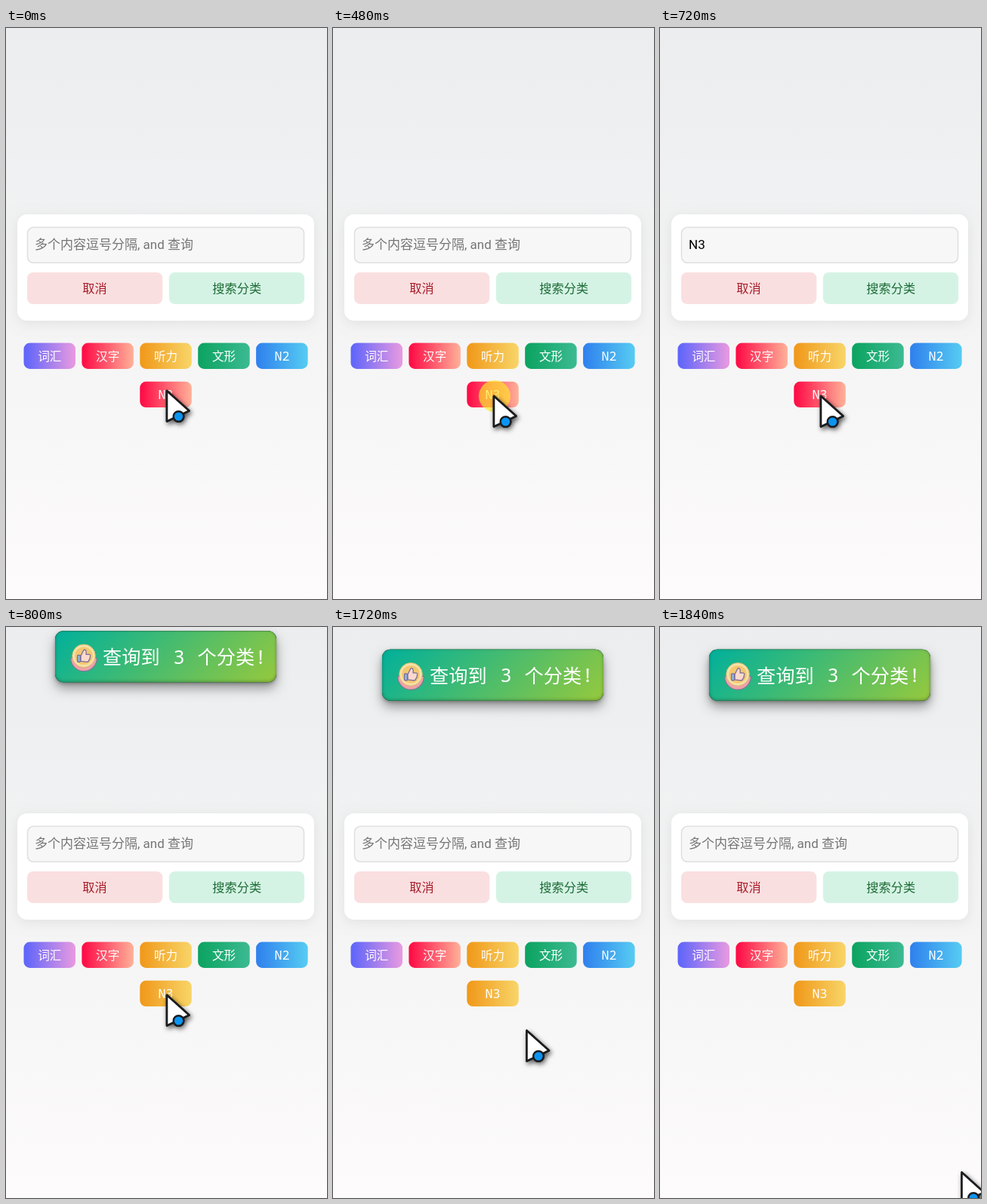
An HTML page with a canvas for the animation above (1.88 s loop, 425 by 757 pixels).

```html
<!DOCTYPE html>
<html lang="zh-CN">
<head>
<meta charset="utf-8">
<title>分类查询</title>
<style>
html, body { margin: 0; width: 100%; height: 100%; overflow: hidden; background: #f4f4f5; }
canvas { display: block; width: 425px; height: 757px; }
</style>
</head>
<body>
<canvas id="stage"></canvas>
<script>
const W = 425, H = 757, LOOP = 1880;
const canvas = document.getElementById('stage');
const ctx = canvas.getContext('2d');
const dpr = window.devicePixelRatio || 1;
canvas.width = W * dpr;
canvas.height = H * dpr;

const CJK = '"Noto Sans CJK SC", "Noto Sans CJK", sans-serif';
const UI = 'Roboto, ' + CJK;
const MONO = '"Noto Sans Mono", ' + CJK;

const PURPLE = ['#5c64fb', '#e99ae0'];
const RED = ['#ff0844', '#ffb199'];
const ORANGE = ['#f09819', '#f8d568'];
const GREEN = ['#0ba360', '#3cba92'];
const BLUE = ['#2f80ed', '#56ccf2'];

function gradient(x0, y0, x1, y1, colors) {
  const g = ctx.createLinearGradient(x0, y0, x1, y1);
  colors.forEach((c, i) => g.addColorStop(i / (colors.length - 1), c));
  return g;
}

function roundRect(x, y, w, h, r) {
  ctx.beginPath();
  ctx.roundRect(x, y, w, h, r);
}

function box(x, y, w, h, r, fill) {
  roundRect(x, y, w, h, r);
  ctx.fillStyle = fill;
  ctx.fill();
}

function disc(x, y, r, fill, stroke, width) {
  ctx.beginPath();
  ctx.arc(x, y, r, 0, Math.PI * 2);
  if (fill) {
    ctx.fillStyle = fill;
    ctx.fill();
  }
  if (stroke) {
    ctx.strokeStyle = stroke;
    ctx.lineWidth = width;
    ctx.stroke();
  }
}

function shadow(color, blur, x, y) {
  ctx.shadowColor = color;
  ctx.shadowBlur = blur * dpr;
  ctx.shadowOffsetX = x * dpr;
  ctx.shadowOffsetY = y * dpr;
}

function text(str, x, y, font, color, align = 'left') {
  ctx.font = font;
  ctx.fillStyle = color;
  ctx.textAlign = align;
  ctx.fillText(str, x, y);
}

function card(value) {
  ctx.save();
  shadow('rgba(0,0,0,0.07)', 16, 0, 4);
  box(15, 247, 393, 141, 13, '#fff');
  ctx.restore();

  box(28, 264, 367, 48, 8, '#f7f7f7');
  roundRect(28.5, 264.3, 366, 47, 8);
  ctx.strokeStyle = '#dfdfe0';
  ctx.lineWidth = 1.5;
  ctx.stroke();
  text(value || '多个内容逗号分隔, and 查询', 38, 293, '17px ' + UI, value ? '#000' : '#757575');

  box(28, 324, 179.3, 42, 8, '#fadfe0');
  box(215.8, 324, 179.3, 42, 8, '#d5f3e5');
  text('取消', 117.5, 350.5, '16.2px ' + UI, '#a71d2a', 'center');
  text('搜索分类', 305.7, 350.5, '16.2px ' + UI, '#1c6b35', 'center');
}

function pill(label, x, y, colors) {
  box(x, y, 68.5, 34.3, 8, gradient(x, 0, x + 68.5, 0, colors));
  const latin = label[0] === 'N';
  text(label, x + 34.3, y + (latin ? 23.3 : 23.8),
    latin ? '500 16.7px ' + MONO : '15.6px ' + CJK, '#fff', 'center');
}

function pills(found) {
  const row = [['词汇', PURPLE], ['汉字', RED], ['听力', ORANGE], ['文形', GREEN], ['N2', BLUE]];
  row.forEach(([label, colors], i) => pill(label, 23.5 + i * 76.9, 417.6, colors));
  pill('N3', 177.3, 468.8, found ? ORANGE : RED);
}

function badge(x, y) {
  ctx.save();
  ctx.translate(x, y);
  ctx.lineJoin = ctx.lineCap = 'round';

  // ribbon under the medal
  for (const [color, width] of [['#8c6b9c', 6.5], ['#eda3a5', 4.6]]) {
    ctx.beginPath();
    ctx.arc(0, 1, 14.5, 0.12, Math.PI - 0.12);
    ctx.strokeStyle = color;
    ctx.lineWidth = width;
    ctx.stroke();
  }
  disc(0, -2, 15.3, '#f5dfa0', '#d7b777', 0.8);
  disc(0, -2, 12.6, '#f3c871', '#fae9b8', 1);

  // thumb up
  const hand = new Path2D('M-4 -2 L0 -10 Q4 -11 3 -4 L7 -4 Q10 -3 8 0 Q9 2 7 3 Q7 6 4 6 L-4 5 Z');
  ctx.fillStyle = '#fbd9cd';
  ctx.fill(hand);
  ctx.strokeStyle = '#77699b';
  ctx.lineWidth = 1.2;
  ctx.stroke(hand);
  box(-8.5, -3, 4, 9, 1, '#8eb4dc');
  ctx.stroke();
  ctx.restore();
}

function toast(y) {
  const x = 65, w = 293, h = 68, r = 11;
  ctx.save();
  shadow('rgba(0,0,0,0.38)', 15, 0, 8);
  box(x, y, w, h, r, '#4bbd6c');
  shadow('rgba(0,0,0,0.25)', 4, 0, 2);
  box(x, y, w, h, r, '#4bbd6c');
  ctx.restore();
  const mx = x + w / 2, my = y + h / 2, d = (w + h) / 4;
  box(x, y, w, h, r, gradient(mx - d, my - d, mx + d, my + d, ['#00b09b', '#96c93d']));

  // soft bevel along the inside edge
  ctx.save();
  roundRect(x, y, w, h, r);
  ctx.clip();
  shadow('rgba(0,0,0,0.28)', 4, 0, -1);
  ctx.beginPath();
  ctx.rect(x - 20, y - 20, w + 40, h + 40);
  ctx.roundRect(x, y, w, h, r);
  ctx.fillStyle = '#000';
  ctx.fill('evenodd');
  ctx.restore();

  badge(103, y + 35);
  const font = '500 25.2px ';
  text('查询到', 128, y + 43.7, font + CJK, '#fff');
  text('3', 229, y + 43.2, font + MONO, '#fff', 'center');
  text('个分类', 253.5, y + 43.7, font + CJK, '#fff');
  text('!', 337, y + 43.2, font + MONO, '#fff', 'center');
}

function cursor(x, y) {
  ctx.save();
  ctx.translate(x, y);
  ctx.lineJoin = 'round';
  const arrow = new Path2D('M0 0 L0 40.5 L29.5 26.5 Z');
  ctx.save();
  shadow('rgba(0,0,0,0.55)', 6, 2, 3);
  ctx.strokeStyle = ctx.fillStyle = '#1b1c1e';
  ctx.lineWidth = 2.6;
  ctx.fill(arrow);
  ctx.stroke(arrow);
  disc(15.5, 34, 8, '#1b1c1e');
  ctx.restore();
  ctx.fillStyle = '#fff';
  ctx.fill(arrow);
  ctx.stroke(arrow);
  ctx.strokeStyle = '#1b1c1e';
  ctx.lineWidth = 2.6;
  ctx.stroke(arrow);
  disc(15.5, 34, 6.8, '#0b95f2', '#1b1c1e', 2.4);
  ctx.restore();
}

function cursorAt(t) {
  if (t < 200) return [213, 481];
  if (t < 1720) return [213, 488];
  const k = t < 1800 ? 0 : t < 1840 ? 2 / 3 : 1;
  return [256.5 + 143 * k, 535 + 188 * k];
}

function clickAlpha(t) {
  if (t < 480 || t >= 720) return 0;
  return t < 600 ? 0.66 : t < 680 ? 0.5 : 0.25;
}

function draw(t) {
  const found = t >= 800;
  ctx.setTransform(dpr, 0, 0, dpr, 0, 0);
  ctx.fillStyle = gradient(0, 0, 0, H, ['#ebedee', '#fdfbfb']);
  ctx.fillRect(0, 0, W, H);
  card(t >= 680 && !found ? 'N3' : '');
  pills(found);
  if (found) toast(t < 880 ? 5.3 : 29.8);
  const alpha = clickAlpha(t);
  if (alpha) disc(214, 488, 21, `rgba(255,232,40,${alpha})`);
  cursor(...cursorAt(t));
}

function loop() {
  draw(performance.now() % LOOP);
  requestAnimationFrame(loop);
}
loop();
</script>
</body>
</html>
```
